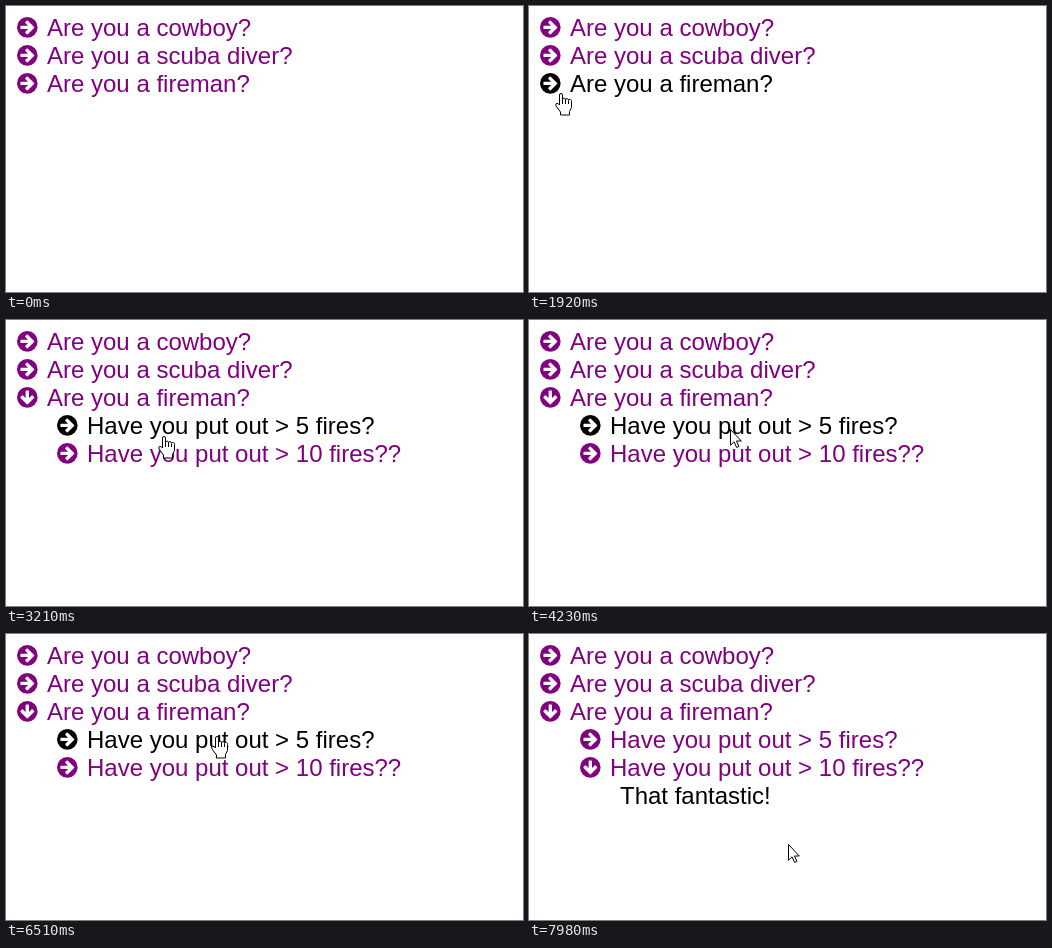
Recreate the animation shown at these times as an HTML page. Size 517 by 286 pixels, loop 8000 ms.

```html
<!DOCTYPE html>
<html lang="en">
<head>
<meta charset="utf-8">
<title>Question tree</title>
<style>
  html, body { margin: 0; width: 100%; height: 100%; overflow: hidden; background: #fff; }
  svg { display: block; width: 517px; height: 286px; }
  text { font: 24px "Liberation Sans", Arial, sans-serif; white-space: pre; }
  .cursor { fill: #fff; stroke: #000; stroke-linejoin: round; }
</style>
</head>
<body>
<svg viewBox="0 0 517 286">
  <defs>
    <path id="pointer" d="M-6.16-1H2.43L-1.42-4.85L.02-6.28L6.3 0L.02 6.28L-1.42 4.85L2.43 1H-6.16Z"
      fill="#fff" stroke="#fff" stroke-width="1.4" stroke-linejoin="round"/>
  </defs>
  <g id="rows"></g>
  <path id="arrow" class="cursor" d="M.5 .5V16.2L4.1 12.8L6.6 18.5L8.9 17.5L6.5 12H11.3Z"/>
  <path id="hand" class="cursor" d="M-1.5 12V2a1.5 1.5 0 0 1 3 0V6.5a1.5 1.5 0 0 1 3 .4a1.5 1.5 0 0 1 3 .6a1.5 1.5 0 0 1 3 1.2V14.5L8.5 18.5V22H-.5V19L-5 13Q-6 10.8-4 10.3Q-2.8 10.3-1.5 12ZM1.5 6.5V11M4.5 7V11M7.5 8V11"/>
</svg>
<script>
const LOOP = 8000, TICK = 30;
const LEFT = 11, TOP = 8, LINE = 28, INDENT = 40, LABEL = 30;
const ICON = { x: 10.3, y: 13.4, r: 10.29 };
const PRESS = 100; // the plain arrow shows this long around a click

const question = (text, clicks = [], children = []) => ({ text, clicks, children });
const answer = text => ({ text, children: [] });

const tree = [
  question("Are you a cowboy?"),
  question("Are you a scuba diver?"),
  question("Are you a fireman?", [2640], [
    question("Have you put out > 5 fires?", [4320, 6360], [answer("That's pretty cool.")]),
    question("Have you put out > 10 fires??", [7170], [answer("That fantastic!")])
  ])
];

const entry = { x: 517, y: 24 };
const moves = [
  { from: 180, to: 960, x: 38, y: 8 },
  { from: 1290, to: 2010, x: 32, y: 88 },
  { from: 2220, to: 2730, x: 48, y: 91 },
  { from: 2730, to: 3270, x: 159, y: 116 },
  { from: 3660, to: 3840, x: 201, y: 109 },
  { from: 4830, to: 5160, x: 216, y: 172 },
  { from: 5460, to: 6210, x: 211, y: 102 },
  { from: 6630, to: 7140, x: 214, y: 133 },
  { from: 7410, to: 7980, x: 259, y: 210 }
];

const easeOut = k => k * (2 - k);
const byId = id => document.getElementById(id);

function make(tag, parent, attrs = {}) {
  const node = document.createElementNS("http://www.w3.org/2000/svg", tag);
  for (const name in attrs) node.setAttribute(name, attrs[name]);
  return parent.appendChild(node);
}

function build(nodes, parent, level = 0) {
  return nodes.flatMap(node => {
    const row = { ...node, parent, x: LEFT + INDENT * level, group: make("g", byId("rows")) };
    if (row.clicks) {
      make("circle", row.group, { cx: ICON.x, cy: ICON.y, r: ICON.r });
      row.icon = make("use", row.group, { href: "#pointer" });
    }
    const label = make("text", row.group, { x: row.icon ? LABEL : 0, y: 22 });
    label.textContent = row.text;
    row.right = row.x + LABEL + label.getComputedTextLength();
    return [row, ...build(row.children, row, level + 1)];
  });
}

const rows = build(tree);
const clicks = rows.flatMap(row => row.clicks || []);
const isOpen = (row, t) => row.clicks.filter(time => time <= t).length % 2 === 1;
const isShown = (row, t) => !row.parent || isOpen(row.parent, t);

function pointerAt(t) {
  let { x, y } = entry;
  for (const move of moves) {
    if (t < move.from) break;
    const k = easeOut(Math.min(1, (t - move.from) / (move.to - move.from)));
    x += (move.x - x) * k;
    y += (move.y - y) * k;
  }
  return { x: Math.round(x), y: Math.round(y) };
}

function draw(t) {
  const { x, y } = pointerAt(t);
  const visible = t >= moves[0].from;
  const pressing = clicks.some(time => Math.abs(time - t) <= PRESS);
  let top = TOP, linked = false;

  for (const row of rows) {
    const shown = isShown(row, t);
    row.group.style.display = shown ? "" : "none";
    if (!shown) continue;
    const touched = visible && x >= row.x && x <= row.right && y >= top && y < top + LINE;
    const black = !row.icon || (touched && y > top);
    row.group.setAttribute("transform", `translate(${row.x} ${top})`);
    row.group.setAttribute("fill", black ? "#000" : "#800080");
    if (row.icon) {
      const turn = isOpen(row, t) ? 90 : 0;
      row.icon.setAttribute("transform", `translate(${ICON.x} ${ICON.y}) rotate(${turn})`);
      linked ||= touched;
    }
    top += LINE;
  }

  const kind = linked && !pressing ? "hand" : "arrow";
  for (const id of ["arrow", "hand"]) {
    byId(id).style.display = visible && id === kind ? "" : "none";
    byId(id).setAttribute("transform", `translate(${x} ${y})`);
  }
}

const start = performance.now();
function frame() {
  const t = (performance.now() - start) % LOOP;
  draw(Math.floor(t / TICK) * TICK);
  requestAnimationFrame(frame);
}
frame();
</script>
</body>
</html>
```
